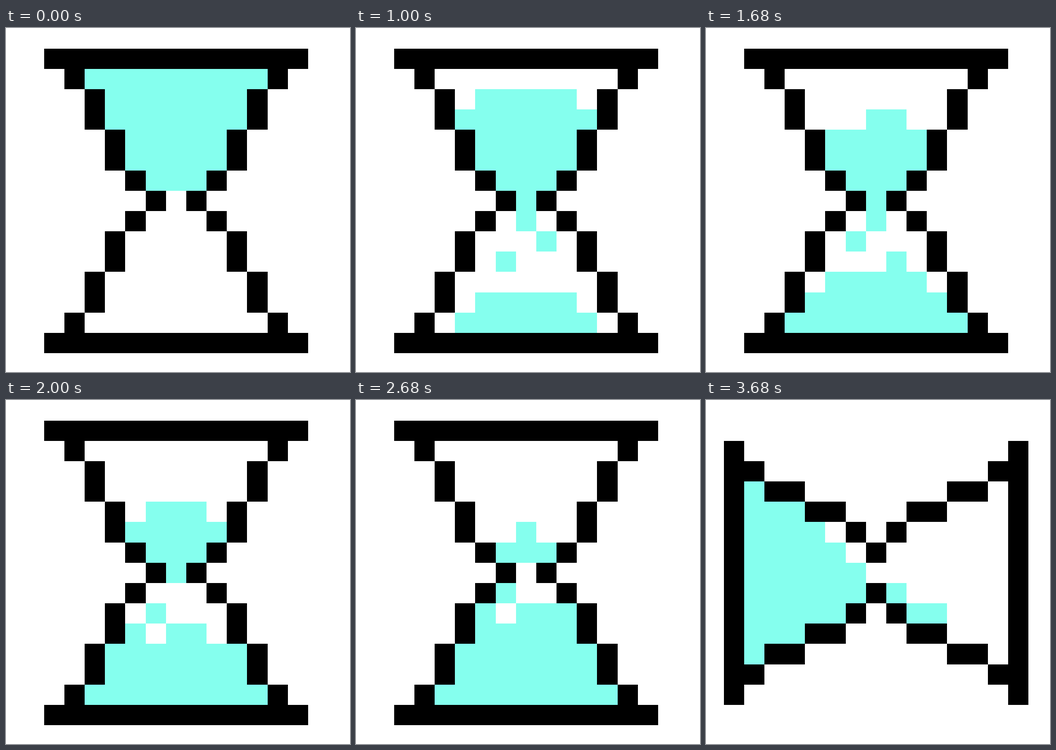
Animation of 748x748 px, one loop 4000 ms. Source, as an HTML page with a canvas:

```html
<!DOCTYPE html>
<html lang="en">
<head>
<meta charset="utf-8">
<title>Hourglass</title>
<style>
  html, body { margin: 0; width: 100%; height: 100%; overflow: hidden; background: #fff; }
  canvas { display: block; }
</style>
</head>
<body>
<canvas id="stage" width="748" height="748"></canvas>
<script>
const ctx = document.getElementById('stage').getContext('2d');
const LOOP = 4000;
const SAND = '#85ffee';
const MIDDLE = 7;

// Distance from the centre column to the wall, rim to neck
const WALL = [6, 5, 4, 4, 3, 3, 2, 1];
const wallAt = row => WALL[MIDDLE - Math.abs(row - MIDDLE)];

// "a-b" fills whole rows between the walls; "row:a-b" fills single cells
const STEPS = [
  [0, '1-6'],
  [360, '1-6 7:7 8:7 13:6-8'],
  [680, '2-6 7:7 8:7 12:6-8 13:5-9'],
  [1000, '3-6 2:5-9 7:7 8:7 9:8 10:6 12:5-9 13:4-10'],
  [1360, '4-6 12-13 3:6-9 7:7 8:7 9:6 10:8 11:6-7'],
  [1680, '4-6 12-13 3:7-8 7:7 8:7 9:6 10:8 11:5-9'],
  [2000, '5-6 11-13 4:6-8 7:7 9:6 10:5 10:7-8'],
  [2360, '5-6 10-13 4:7 7:7 8:7 9:7-8'],
  [2680, '6-6 10-13 5:7 8:6 9:5 9:7-9'],
  [3000, '9-13 5:7 6:7-8 7:7 8:6'],
  [3360, '7-13'],
  [3680, '1-4 5:6-9 6:7-8 8:8 9:9 10:9', true]
];

const edge = i => Math.round(38.76 + 44.146 * i);

function span(row, from, to, sideways) {
  const [x, y, right, bottom] = sideways
    ? [row, from, row + 1, to + 1]
    : [from, row, to + 1, row + 1];
  ctx.fillRect(edge(x), edge(y) + 6, edge(right) - edge(x), edge(bottom) - edge(y));
}

function range(text) {
  const [from, to = from] = text.split('-').map(Number);
  return [from, to];
}

function drawSand(layout, sideways) {
  ctx.fillStyle = SAND;
  for (const part of layout.split(' ')) {
    if (part.includes(':')) {
      const [row, cells] = part.split(':');
      span(+row, ...range(cells), sideways);
      continue;
    }
    const [first, last] = range(part);
    for (let row = first; row <= last; row++) {
      const reach = wallAt(row) - 1;
      span(row, MIDDLE - reach, MIDDLE + reach, sideways);
    }
  }
}

function drawGlass(sideways) {
  ctx.fillStyle = '#000';
  for (let row = 0; row <= 2 * MIDDLE; row++) {
    const left = MIDDLE - wallAt(row);
    const right = MIDDLE + wallAt(row);
    if (row % (2 * MIDDLE) === 0) {
      span(row, left, right, sideways);
    } else {
      span(row, left, left, sideways);
      span(row, right, right, sideways);
    }
  }
}

function draw() {
  const time = performance.now() % LOOP;
  const [, layout, sideways] = STEPS.filter(([start]) => start <= time).pop();
  ctx.fillStyle = '#fff';
  ctx.fillRect(0, 0, 748, 748);
  drawSand(layout, sideways);
  drawGlass(sideways);
  requestAnimationFrame(draw);
}

draw();
</script>
</body>
</html>
```
